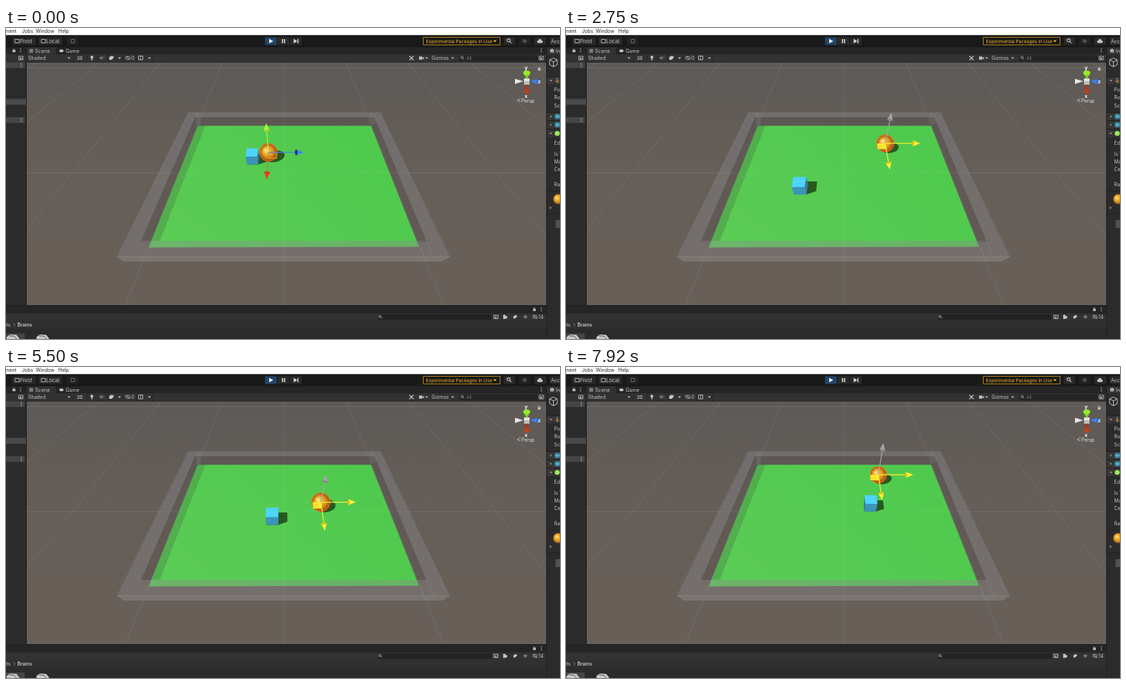
These frames come from a looping animation (800 px wide and 450 px high, 8000 ms). An HTML page with a canvas:

```html
<!DOCTYPE html>
<html lang="en">
<head>
<meta charset="utf-8">
<title>Scene view</title>
<style>
html, body { margin: 0; width: 100%; height: 100%; overflow: hidden; background: #191919; }
canvas { display: block; width: 800px; height: 450px; }
</style>
</head>
<body>
<canvas id="stage" width="800" height="450"></canvas>
<script>
const ctx = document.getElementById('stage').getContext('2d');
const FONT = 'Inter, Roboto, sans-serif';
const LIGHT = '#c4c4c4', PANEL = '#2b2b2b', BAR = '#323232', DARK = '#1e1e1e';

// ---- drawing helpers ----
function rect(x, y, w, h, color) {
  ctx.fillStyle = color;
  ctx.fillRect(x, y, w, h);
}
function trace(points, closed) {
  ctx.beginPath();
  points.forEach(([x, y], i) => i ? ctx.lineTo(x, y) : ctx.moveTo(x, y));
  if (closed) ctx.closePath();
}
function poly(points, color) {
  trace(points, true);
  ctx.fillStyle = color;
  ctx.fill();
}
function line(points, color, width = 1, closed = false) {
  trace(points, closed);
  ctx.strokeStyle = color;
  ctx.lineWidth = width;
  ctx.stroke();
}
function oval(x, y, rx, ry, color, angle = 0) {
  ctx.beginPath();
  ctx.ellipse(x, y, rx, ry, angle, 0, Math.PI * 2);
  ctx.fillStyle = color;
  ctx.fill();
}
function ring(x, y, r, color, width = 1) {
  ctx.beginPath();
  ctx.arc(x, y, r, 0, Math.PI * 2);
  ctx.strokeStyle = color;
  ctx.lineWidth = width;
  ctx.stroke();
}
function text(str, x, y, color = LIGHT, size = 7, weight = 400, align = 'left') {
  ctx.font = `${weight} ${size}px ${FONT}`;
  ctx.textAlign = align;
  ctx.fillStyle = color;
  ctx.fillText(str, x, y);
}
function caret(x, y, color = LIGHT, s = 2) {
  poly([[x - s, y - s / 2], [x + s, y - s / 2], [x, y + s / 2 + 0.5]], color);
}
function dots(x, y) {
  for (let i = -1; i <= 1; i++) rect(x - 0.6, y + i * 2.3 - 0.6, 1.2, 1.2, LIGHT);
}
function lock(x, y) {
  rect(x - 2, y, 4, 3, LIGHT);
  ctx.beginPath();
  ctx.arc(x, y, 1.5, Math.PI, 0);
  ctx.strokeStyle = LIGHT;
  ctx.lineWidth = 0.8;
  ctx.stroke();
}
function lens(x, y, s = 1) {
  ring(x - s * 0.6, y - s * 0.6, 2 * s, LIGHT, s);
  line([[x + s, y + s], [x + 3 * s, y + 3 * s]], LIGHT, s);
}
function hollow(x, y, w, h, color = LIGHT) {
  line([[x, y], [x + w, y], [x + w, y + h], [x, y + h]], color, 0.9, true);
}
function popOut(x, y) {
  hollow(x - 3, y - 2.5, 6, 5);
  rect(x - 1.5, y - 0.5, 2.5, 2, LIGHT);
}
function eye(x, y) {
  ctx.beginPath();
  ctx.ellipse(x, y, 3.5, 2, 0, 0, Math.PI * 2);
  ctx.strokeStyle = LIGHT;
  ctx.lineWidth = 0.8;
  ctx.stroke();
  line([[x - 3, y - 3], [x + 3, y + 3]], LIGHT, 0.9);
}

// ---- camera ----
const CX = 402, CY = 225, FOCAL = 304, HEIGHT = 10, SIN = 0.7946, COS = 0.607;
function project([x, y, z]) {
  const h = HEIGHT - y;
  const depth = h * SIN + z * COS;
  return [CX + FOCAL * x / depth, CY + FOCAL * (h * COS - z * SIN) / depth, depth];
}
function unproject(sx, sy, y) {
  const h = HEIGHT - y;
  const depth = FOCAL * h / (FOCAL * SIN + (sy - CY) * COS);
  return [(sx - CX) * depth / FOCAL, y, (depth - h * SIN) / COS];
}

// ---- motion: [step, ball x, ball y, cube x, cube y, hovered] ----
const STEP = 1000 / 12, STEPS = 96;
const KEYS = [
  [0, 379, 180, 356, 186, 0], [10, 461, 223, 370.5, 236, 1],
  [23, 446, 164, 312, 262, 0], [43, 476, 170, 372, 195, 0],
  [58, 457, 170, 378, 223, 1], [76, 451, 237, 397.5, 202, 1],
  [95, 451, 156, 439.5, 197.5, 1]
];
function spline(a, b, c, d, u) {
  return b + u / 2 * (c - a + u * (2 * a - 5 * b + 4 * c - d + u * (3 * (b - c) + d - a)));
}
function pose(step) {
  let i = 0;
  while (i < KEYS.length - 2 && step >= KEYS[i + 1][0]) i++;
  const a = KEYS[i], b = KEYS[i + 1];
  const before = KEYS[Math.max(0, i - 1)], after = KEYS[Math.min(KEYS.length - 1, i + 2)];
  const u = (step - a[0]) / (b[0] - a[0]);
  const last = i === KEYS.length - 2;
  const v = Math.min(1, Math.max(0, last ? (u - 0.15) / 0.85 : (u - 0.15) / 0.7));
  const ease = v * v * (3 - 2 * v);
  const cube = k => spline(before[k], a[k], b[k], after[k], u);
  const drag = u > 0.15 && (last || u < 0.85);
  return {
    ball: [a[1] + (b[1] - a[1]) * ease, a[2] + (b[2] - a[2]) * ease],
    cube: [cube(3), cube(4)],
    drag,
    hover: drag || (u < 0.5 ? a : b)[5] === 1
  };
}

// ---- scene ----
const SIDE = 0.72, RADIUS = 0.52, LEAN_X = 0.74, LEAN_Z = 0.33;
const SHADOW = '#27591f';

function ground() {
  const sky = ctx.createLinearGradient(0, 50, 0, 401);
  sky.addColorStop(0, '#5e5a57');
  sky.addColorStop(0.45, '#665e58');
  sky.addColorStop(1, '#685f58');
  rect(30, 50, 750, 351, sky);
  const faint = 'rgba(190,190,185,0.15)';
  for (let i = -4; i <= 4; i++) {
    const slope = i * 0.4;
    line([[402 + slope * 223, 50], [402 + slope * 574, 401]], faint);
  }
  for (const y of [57.5, 209.5]) line([[30, y], [780, y]], faint);
}

function arena() {
  const green = ctx.createLinearGradient(480, 141, 300, 330);
  green.addColorStop(0, '#4fca4e');
  green.addColorStop(1, '#5acb55');
  poly([[277, 141.5], [527, 141.5], [596.5, 316.5], [206, 317.5]], green);
  // floor grid seen through the surface
  line([[402, 141], [402, 317]], 'rgba(150,220,140,0.25)');
  line([[250, 209.5], [554, 209.5]], 'rgba(150,220,140,0.18)');
}

function walls() {
  const top = 'rgba(135,135,138,0.42)', inner = 'rgba(70,66,66,0.16)';
  poly([[277, 141], [288, 141], [222, 308], [210, 308]], 'rgba(60,80,60,0.24)');
  poly([[273, 129], [277, 141], [206, 317], [195, 308]], inner);
  poly([[532, 129], [527, 141], [596.5, 317], [607, 308]], inner);
  poly([[273, 129], [532, 129], [527, 141], [277, 141]], inner);
  poly([[263, 122], [541, 122], [532, 129], [273, 129]], top);
  poly([[263, 122], [273, 129], [195, 308], [160, 331]], top);
  poly([[541, 122], [532, 129], [607, 308], [641, 331]], top);
  poly([[195, 308], [607, 308], [641, 331], [160, 331]], 'rgba(140,138,142,0.36)');
  poly([[160, 331], [641, 331], [630, 338], [170, 338]], 'rgba(145,143,143,0.45)');
  poly([[273, 122], [282, 124], [281, 141], [275, 141]], 'rgba(140,140,140,0.2)');
  poly([[524, 122], [533, 124], [536, 136], [527, 141]], 'rgba(140,140,140,0.2)');
  const edge = 'rgba(165,165,165,0.3)';
  line([[160, 331], [641, 331]], edge);
  line([[598, 317], [606, 337], [618, 331], [607, 308]], edge, 0.8);
}

function cubeCorners([x, , z]) {
  const h = SIDE / 2;
  return (y, dx = 0, dz = 0) => [[-h, -h], [h, -h], [h, h], [-h, h]]
    .map(([px, pz]) => project([x + px + dx, y, z + pz + dz]));
}
function cubeShadow(center) {
  const at = cubeCorners(center);
  const base = at(0), cast = at(0, SIDE * LEAN_X, SIDE * LEAN_Z);
  poly([base[0], base[1], cast[1], cast[2], cast[3], base[3]], SHADOW);
}
function cube(center) {
  const at = cubeCorners(center);
  const lo = at(0), hi = at(SIDE);
  const side = center[0] < 0 ? [1, 2] : [0, 3];
  poly([lo[side[0]], lo[side[1]], hi[side[1]], hi[side[0]]], '#35819f');
  poly([lo[0], lo[1], hi[1], hi[0]], '#3b95b9');
  poly(hi, '#4ed4ff');
}

function ballShadow([x, , z]) {
  const len = Math.hypot(LEAN_X, LEAN_Z), ux = LEAN_X / len, uz = LEAN_Z / len;
  const points = [];
  for (let i = 0; i < 40; i++) {
    const a = i * Math.PI / 20;
    const along = RADIUS * (len + Math.hypot(1, len) * Math.cos(a));
    const across = RADIUS * Math.sin(a);
    points.push(project([x + along * ux - across * uz, 0, z + along * uz + across * ux]));
  }
  poly(points, SHADOW);
}
function goldSphere(x, y, r) {
  const g = ctx.createRadialGradient(x - r * 0.35, y - r * 0.3, r * 0.05, x, y, r);
  g.addColorStop(0, '#ffe78c');
  g.addColorStop(0.3, '#f2bb3c');
  g.addColorStop(0.7, '#d28f22');
  g.addColorStop(1, '#8f5512');
  oval(x, y, r, r, g);
}
function ball(center) {
  const [x, y, depth] = project(center);
  const r = RADIUS * FOCAL / depth;
  goldSphere(x, y, r);
  ring(x, y, r + 0.6, '#ff5a12', 1.5);
}

function cone(origin, tip, color, dark) {
  const dx = tip[0] - origin[0], dy = tip[1] - origin[1], len = Math.hypot(dx, dy);
  const ux = dx / len, uy = dy / len;
  const bx = tip[0] - ux * 10.5, by = tip[1] - uy * 10.5;
  poly([[bx - uy * 4.2, by + ux * 4.2], tip, [bx + uy * 4.2, by - ux * 4.2]], color);
  oval(bx, by, 1.5, 4.2, dark, Math.atan2(uy, ux));
}
function handle(center, state) {
  const o = project(center), size = 50.5 * o[2] / FOCAL;
  const at = (x, y, z) => project([center[0] + x * size, center[1] + y * size, center[2] + z * size]);
  const side = o[0] < CX ? 0.24 : -0.24;
  const quad = [at(0, 0, 0), at(side, 0, 0), at(side, 0, -0.24), at(0, 0, -0.24)];
  if (state.hover) poly(quad, 'rgba(255,238,50,0.9)');
  else line(quad, 'rgba(255,170,30,0.9)', 1, true);
  const yellow = ['#fff02f', '#d2c322'];
  const axes = [
    [[0, 0, -1], ...(state.drag ? yellow : ['#f4421d', '#d0381a']), state.drag ? 1 : 0.5],
    [[1, 0, 0], ...(state.drag ? yellow : ['#3c82f2', '#17305f']), 1],
    [[0, 1, 0], ...(state.drag ? ['#a5a5a5', '#858585'] : ['#b4f23c', '#98d62e']), 1]
  ];
  for (const [dir, color, dark, alpha] of axes) {
    const tip = at(...dir), stem = at(...dir.map(v => v * 0.84));
    ctx.globalAlpha = alpha;
    line([o, stem], color, 1.2);
    ctx.globalAlpha = 1;
    cone(o, tip, color, dark);
  }
}

function orientation() {
  poly([[735, 73.5], [735, 81], [747, 77]], '#e6e6e6');
  poly([[768, 73.5], [768, 81], [757, 77]], '#3c84ef');
  oval(768, 77.3, 1.5, 3.8, '#2d66c4');
  poly([[747, 65], [757, 65], [752, 75]], '#79c91f');
  oval(752, 64.8, 5.2, 3.4, '#93ed2c');
  poly([[748, 92], [756, 92], [752, 80]], '#a83a1c');
  oval(752, 92, 4, 3, '#b5451f');
  rect(748, 73, 8, 9, '#bcbcbc');
  rect(748, 73, 8, 4, '#e2e2e2');
  text('y', 751, 60, '#fff', 7, 700, 'center');
  text('z', 770, 79.5, '#fff', 7, 700, 'center');
  text('x', 751, 101, '#fff', 7, 700, 'center');
  line([[742.5, 102.5], [738.5, 104.7], [742.5, 107]], '#ddd', 0.8);
  text('Persp', 744, 107.5, '#e0e0e0', 7);
  lock(770, 58.5);
}

// ---- editor chrome ----
function topBars() {
  rect(0, 0, 800, 450, DARK);
  rect(0, 0, 800, 10.5, '#fff');
  text('Component', 15, 7.3, '#222', 7, 400, 'right');
  text('Jobs', 23, 7.3, '#222');
  text('Window', 43, 7.3, '#222');
  text('Help', 75.5, 7.3, '#222');

  rect(0, 10.5, 800, 17, '#191919');
  rect(9, 13.5, 34, 11, '#282828');
  rect(47, 13.5, 34, 11, '#282828');
  rect(88, 13.5, 17, 11, '#222');
  hollow(13, 16.5, 6, 5);
  hollow(51, 16.5, 6, 5);
  text('Pivot', 20, 21.8, LIGHT, 7.5);
  text('Local', 58, 21.8, LIGHT, 7.5);
  hollow(94, 16.5, 5, 5, '#777');
  rect(374, 13.5, 17, 11, '#1f4668');
  rect(392, 13.5, 17, 11, '#2a2a2a');
  rect(410, 13.5, 17, 11, '#2a2a2a');
  poly([[380, 15.7], [386, 19], [380, 22.3]], '#eee');
  rect(398.5, 16, 1.6, 6, '#ddd');
  rect(401.5, 16, 1.6, 6, '#ddd');
  poly([[415.5, 15.8], [420.5, 19], [415.5, 22.2]], '#ddd');
  rect(420.8, 16, 1.4, 6, '#ddd');
  line([[602.5, 13.5], [713.5, 13.5], [713.5, 24.5], [602.5, 24.5]], '#b78416', 1, true);
  text('Experimental Packages In Use', 606.5, 21.5, '#eeb327', 6.7);
  caret(706, 19, '#eeb327', 2.4);
  rect(719, 13.5, 16, 11, '#2a2a2a');
  rect(741, 13.5, 16, 11, '#222');
  rect(763, 13.5, 17, 11, '#2a2a2a');
  rect(785, 13.5, 15, 11, '#2a2a2a');
  lens(726.5, 18.5, 1.1);
  for (let i = 0; i < 3; i++) {
    const a = i * Math.PI / 3, x = Math.cos(a) * 3.5, y = Math.sin(a) * 3.5;
    line([[749 - x, 19 - y], [749 + x, 19 + y]], '#777', 0.8);
  }
  oval(771, 18.5, 2.6, 2.6, LIGHT);
  oval(771, 20, 4.2, 1.9, LIGHT);
  text('Account', 787, 21.5);
}

function sceneBars() {
  rect(30, 28, 750, 10.5, '#252525');
  rect(30, 28, 42, 10.5, BAR);
  rect(30, 38, 750, 11.5, BAR);
  for (let i = 0; i < 2; i++) {
    line([[35 + i * 2.5, 30], [35 + i * 2.5, 36]], LIGHT, 0.7);
    line([[33.5, 31.8 + i * 2.5], [39.5, 31.8 + i * 2.5]], LIGHT, 0.7);
  }
  text('Scene', 42, 35.7, LIGHT, 7.2);
  oval(80, 33, 3, 2, LIGHT);
  text('Game', 86, 35.7, LIGHT, 7.2);
  dots(773, 32.5);
  text('Shaded', 32, 46);
  caret(91, 43.5);
  for (const x of [97, 116.5, 132, 146, 168, 188, 212]) rect(x, 38.5, 0.7, 10.5, '#222');
  text('2D', 102.5, 45.8, LIGHT, 6, 600);
  oval(124, 42.3, 2, 2.4, LIGHT);
  rect(123, 45, 2, 1.5, LIGHT);
  poly([[135, 42], [137, 42], [139, 40], [139, 46.5], [137, 44.5], [135, 44.5]], '#777');
  line([[141, 41], [141, 45]], '#777');
  poly([[149, 46], [149, 42], [153, 40], [156, 42], [153, 46]], LIGHT);
  caret(164, 43.5);
  eye(176, 43.3);
  text('0', 181, 46);
  hollow(191.5, 40.5, 6, 5.5);
  line([[194.5, 40], [194.5, 46]], LIGHT, 0.7);
  caret(207, 43.5);
  line([[582.5, 40.5], [588.5, 46.5]], LIGHT, 1.2);
  line([[588.5, 40.5], [582.5, 46.5]], LIGHT, 1.2);
  rect(596.5, 41.3, 4.5, 4.5, LIGHT);
  poly([[601, 43.5], [603.5, 41.5], [603.5, 45.7]], LIGHT);
  caret(607.5, 43.5);
  text('Gizmos', 614.5, 46);
  caret(645, 43.5);
  rect(654, 39.5, 114, 8.5, '#252525');
  lens(659, 43, 0.8);
  text('All', 665, 45.8, '#777', 6.5);
  popOut(773, 43.5);
}

function leftPanel() {
  rect(0, 28, 29, 373, PANEL);
  rect(0, 28, 29, 10, '#252525');
  rect(0, 38, 29, 11, BAR);
  lock(11.5, 32);
  dots(21, 32.5);
  popOut(21.5, 43.5);
  rect(0, 49.5, 27, 8.5, '#454545');
  dots(22, 54);
  rect(0, 102.5, 29, 8.5, '#4a4a4a');
  rect(0, 129, 27, 8.5, '#454545');
  dots(22, 133.3);
}

function bottomPanel() {
  rect(0, 401, 780, 49, DARK);
  rect(0, 402, 780, 11, '#252525');
  rect(0, 413, 780, 11, BAR);
  rect(0, 424, 780, 26, PANEL);
  rect(0, 424, 780, 10.5, '#303030');
  lock(763, 406.5);
  dots(773, 407);
  rect(537, 414, 164, 8.5, '#232323');
  lens(540.5, 417.8, 0.8);
  popOut(707.5, 418);
  rect(718, 415, 3, 6, LIGHT);
  oval(722, 418.5, 2, 2, LIGHT);
  poly([[732, 418.5], [735, 415.5], [738, 416], [738, 417.5], [734.5, 421]], LIGHT);
  const star = [];
  for (let i = 0; i < 10; i++) {
    const a = i * Math.PI / 5 - Math.PI / 2, r = i % 2 ? 1.5 : 3.5;
    star.push([750 + r * Math.cos(a), 418 + r * Math.sin(a)]);
  }
  poly(star, '#858585');
  eye(764, 418);
  text('14', 769, 420.7);
  text('Assets', 6.5, 432, LIGHT, 7, 400, 'right');
  line([[10.5, 427], [13, 429.5], [10.5, 432]], '#888', 0.8);
  text('Brains', 16.5, 432, '#ddd', 7, 500);
  rect(0, 442, 27, 8, '#454545');
  for (const x of [10, 53]) {
    poly([[x - 9, 447], [x - 4, 443.5], [x + 5, 444], [x + 9, 449], [x + 9, 450], [x - 9, 450]], '#c9c9c9');
    line([[x - 5, 445.5], [x + 2, 446], [x + 5, 450]], '#555');
  }
}

function rightPanel() {
  rect(781, 28, 19, 422, PANEL);
  rect(781, 28, 19, 10.5, BAR);
  oval(788.5, 33, 2.8, 2.8, LIGHT);
  rect(788, 32.5, 1, 2.5, '#333');
  text('Inspector', 794, 35.7, LIGHT, 7.2);
  line([[785, 46], [790.5, 43.5], [796, 46], [796, 53], [790.5, 56], [785, 53]], LIGHT, 1, true);
  line([[785, 46], [790.5, 49], [796, 46]], LIGHT);
  line([[790.5, 49], [790.5, 56]], LIGHT);
  for (const y of [76, 128, 140, 152.5]) {
    rect(781, y - 5.5, 19, 11, '#363636');
    rect(781, y - 6, 19, 0.7, DARK);
    if (y === 76 || y > 150) caret(787, y, '#999', 2.2);
    else poly([[786, y - 2], [788.5, y], [786, y + 2]], '#888');
  }
  line([[796, 72], [796, 80]], '#85d04c');
  line([[793, 77], [799, 77]], '#ec6545');
  for (const y of [128, 140]) {
    rect(792.5, y - 3.5, 7.5, 7, '#357f9b');
    line([[792.5, y], [800, y]], '#8dddf3', 0.7);
    line([[796, y - 3.5], [796, y + 3.5]], '#8dddf3', 0.7);
  }
  oval(796, 152.5, 3.6, 3.6, '#9ce957');
  const labels = [['Position', 92], ['Rotation', 103.3], ['Scale', 114.5], ['Edit', 168.5],
    ['Is Trigger', 184.5], ['Material', 195.8], ['Center', 207], ['Radius', 229]];
  for (const [label, y] of labels) text(label, 791.5, y);
  rect(781, 236, 19, 0.7, DARK);
  goldSphere(797.5, 247.5, 7.5);
  poly([[785, 257.5], [788.5, 260], [785, 262.5]], '#777');
  rect(781, 268, 19, 0.7, DARK);
  rect(793.5, 278, 7, 11.5, '#515151');
}

function draw(time) {
  const step = Math.floor((time % 8000 + 5) / STEP) % STEPS;
  const state = pose(step);
  const ballAt = unproject(...state.ball, RADIUS);
  const cubeAt = unproject(...state.cube, SIDE / 2);

  topBars();
  ctx.save();
  ctx.beginPath();
  ctx.rect(30, 49.5, 750, 351.5);
  ctx.clip();
  ground();
  arena();
  cubeShadow(cubeAt);
  ballShadow(ballAt);
  walls();
  if (cubeAt[2] > ballAt[2]) { cube(cubeAt); ball(ballAt); }
  else { ball(ballAt); cube(cubeAt); }
  handle(ballAt, state);
  orientation();
  ctx.restore();
  sceneBars();
  leftPanel();
  bottomPanel();
  rightPanel();
}

const start = performance.now();
function tick() {
  draw(performance.now() - start);
  requestAnimationFrame(tick);
}
tick();
</script>
</body>
</html>
```
